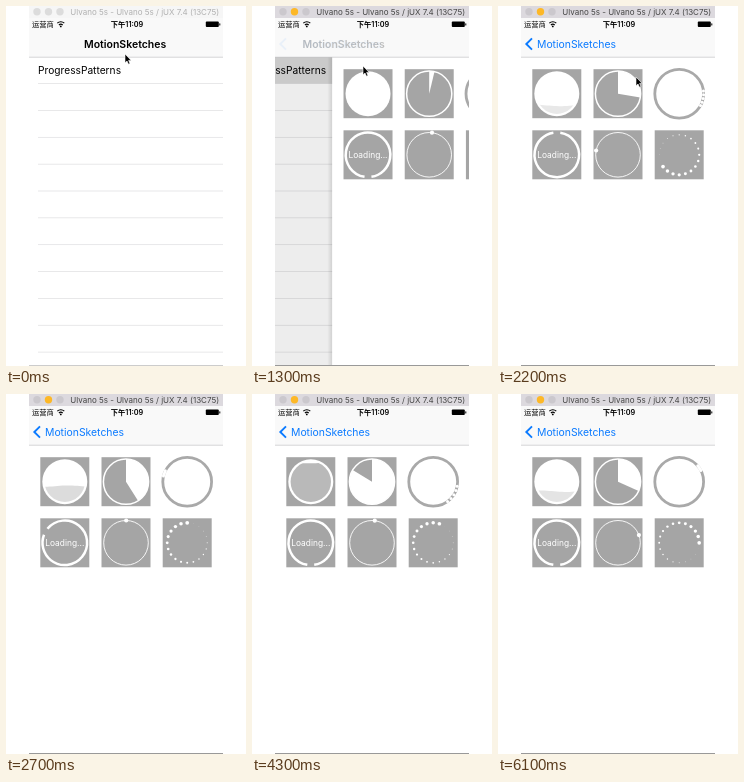
An HTML page that plays this animation: 240 px wide and 360 px high, repeating every 6.2 s.

```html
<!DOCTYPE html>
<html lang="zh">
<head>
<meta charset="utf-8">
<title>Loading indicators</title>
<style>
  html, body { margin: 0; width: 100%; height: 100%; overflow: hidden; background: #fff; }
  svg { display: block; width: 240px; height: 360px; }
  text { font-family: Inter, "Noto Sans CJK SC", "Noto Sans CJK", sans-serif; }
  .tile { fill: #a5a5a5; }
  .ring { fill: none; stroke: #fff; }
  .status { font-size: 7.3px; }
</style>
</head>
<body>
<svg viewBox="0 0 240 360">
  <defs>
    <clipPath id="screen"><rect x="23" y="51" width="194" height="309"/></clipPath>
    <clipPath id="bowl"><circle r="20.2"/></clipPath>
    <linearGradient id="shade">
      <stop offset="0" stop-opacity="0"/>
      <stop offset="1" stop-opacity=".12"/>
    </linearGradient>
  </defs>

  <g clip-path="url(#screen)">
    <g id="list">
      <rect id="row" x="23" y="51" width="194" height="26.8" fill="#d9d9d9"/>
      <text x="32" y="68" font-size="10.2">ProgressPatterns</text>
      <g id="lines" fill="#dedee0"></g>
    </g>
    <rect id="dim" x="23" y="51" width="194" height="309"/>
    <g id="page">
      <rect x="18" y="51" width="5" height="309" fill="url(#shade)"/>
      <rect x="23" y="51" width="194" height="309" fill="#fff"/>

      <g transform="translate(58.8 87.7)">
        <rect class="tile" x="-24.5" y="-24.5" width="49" height="49"/>
        <circle r="22.5" fill="#fff"/>
        <path id="water" clip-path="url(#bowl)"/>
      </g>

      <g transform="translate(120 87.7)">
        <rect class="tile" x="-24.5" y="-24.5" width="49" height="49"/>
        <circle class="ring" r="22.6" stroke-width="1.5"/>
        <path id="pie" fill="#fff"/>
      </g>

      <g transform="translate(181.2 87.7)">
        <circle r="24.4" fill="none" stroke="#a9a9a9" stroke-width="2.8"/>
        <g id="beads" fill="#fff"></g>
      </g>

      <g transform="translate(58.8 148.8)">
        <rect class="tile" x="-24.5" y="-24.5" width="49" height="49"/>
        <circle id="arc" class="ring" r="22.3" stroke-width="2.5" pathLength="360" stroke-dasharray="342 18"/>
        <text y="3" font-size="8.4" fill="#fff" text-anchor="middle">Loading...</text>
      </g>

      <g transform="translate(120 148.8)">
        <rect class="tile" x="-24.5" y="-24.5" width="49" height="49"/>
        <circle class="ring" r="22.3" stroke-width=".9"/>
        <circle id="orbit" r="2.1" fill="#fff"/>
      </g>

      <g transform="translate(181.2 148.8)">
        <rect class="tile" x="-24.5" y="-24.5" width="49" height="49"/>
        <g id="dots" fill="#fff"></g>
      </g>
    </g>
  </g>

  <rect x="23" y="12" width="194" height="39" fill="#f9f9f9"/>
  <rect x="23" y="50.8" width="194" height=".7" fill="#c4c4c6"/>
  <text id="title" y="41.7" font-size="10.5" font-weight="600">MotionSketches</text>
  <g id="back" fill="#0a7aff">
    <path d="M34 32.3 28.3 38 34 43.7" fill="none" stroke="#0a7aff" stroke-width="1.9"/>
    <text id="label" y="41.7" font-size="10.4">MotionSketches</text>
  </g>

  <text class="status" x="26" y="20.8">运营商</text>
  <g fill="none" stroke="#000" stroke-width="1.1">
    <path d="M51.3 17.2a5 5 0 0 1 7 0M52.9 19a2.8 2.8 0 0 1 3.8 0"/>
  </g>
  <circle cx="54.8" cy="20.4" r=".9"/>
  <text class="status" x="121" y="20.8" font-weight="600" text-anchor="middle">下午11:09</text>
  <rect x="199.8" y="15.6" width="13" height="5.3" rx=".9"/>
  <rect x="213.3" y="17.2" width="1" height="2.2" rx=".5"/>

  <rect id="bar" x="23" width="194" height="12"/>
  <circle class="light" cx="31" cy="5.7" r="3.7"/>
  <circle class="light" id="amber" cx="42.5" cy="5.7" r="3.7"/>
  <circle class="light" cx="54" cy="5.7" r="3.7"/>
  <text id="caption" x="138.7" y="8.8" font-size="8" text-anchor="middle">Ulvano 5s - Ulvano 5s / jUX 7.4 (13C75)</text>
  <rect id="base" x="23" y="359" width="194" height="1"/>

  <path id="cursor" d="M0 0V8.8L2 7 3.5 10.2 5 9.5 3.6 6.4H6.2Z" stroke="#fff" stroke-width=".6"/>
</svg>

<script>
const LOOP = 6200, STEP = 100, TAU = Math.PI * 2;
const PUSH = 1152, ACTIVE = 800, PRESS = 1000;
const DOTS = 20;
// time, x, y of the pointer tip
const TRACK = [
  [0, 119, 48], [100, 119, 48], [500, 111, 60], [1500, 111, 60],
  [2200, 138, 71], [2300, 140, 78], [2700, 185, 365]
];

const $ = id => document.getElementById(id);
const set = (el, attrs) => { for (const k in attrs) el.setAttribute(k, attrs[k]); };
const add = (parent, tag, attrs) => {
  const el = document.createElementNS("http://www.w3.org/2000/svg", tag);
  set(el, attrs);
  return parent.appendChild(el);
};
const wrap = v => v - Math.floor(v);
// clock angle in degrees, zero at the top
const polar = (deg, r) => {
  const a = deg * TAU / 360;
  return [r * Math.sin(a), -r * Math.cos(a)];
};
const place = (el, deg, r) => {
  const [cx, cy] = polar(deg, r);
  set(el, { cx, cy });
};

for (let i = 1; i <= 11; i++) add($("lines"), "rect", { x: 32, y: 50.4 + i * 26.85, width: 185, height: .7 });
const beads = Array.from({ length: 5 }, () => add($("beads"), "circle", { r: 1.5 }));
const dots = Array.from({ length: DOTS }, (_, i) => {
  const dot = add($("dots"), "circle", {});
  place(dot, i * 360 / DOTS, 20);
  return dot;
});
const lights = document.querySelectorAll(".light");

function drawWindow(t) {
  const on = t >= ACTIVE;
  set($("bar"), { fill: on ? "#dcd9de" : "#f6f6f6" });
  set($("caption"), { fill: on ? "#444" : "#b0b0b0" });
  set($("base"), { fill: on ? "#999" : "#ccc" });
  lights.forEach(l => set(l, { fill: on ? "#cbc8cd" : "#dcdcdc" }));
  if (on) set($("amber"), { fill: "#fdb827" });
}

function drawPush(t) {
  const p = t < PUSH ? 0 : t > 1900 ? 1 : 1 - Math.exp(-8.25 * (t - PUSH) / 1000);
  const x = 78 - 39 * p;
  set($("row"), { opacity: t >= PRESS ? 1 : 0 });
  set($("list"), { transform: `translate(${-58 * p} 0)` });
  set($("dim"), { opacity: .1 * p });
  set($("page"), { transform: `translate(${194 * (1 - p)} 0)`, opacity: p ? 1 : 0 });
  set($("title"), { x, opacity: (1 - p) ** 1.2 });
  set($("label"), { x });
  set($("back"), { opacity: p ** 8 });
}

function drawCursor(t) {
  const i = TRACK.findIndex(k => k[0] > t);
  set($("cursor"), { opacity: i < 0 ? 0 : 1 });
  if (i < 0) return;
  const [t0, x0, y0] = TRACK[i - 1], [t1, x1, y1] = TRACK[i];
  const f = (t - t0) / (t1 - t0);
  set($("cursor"), { transform: `translate(${x0 + (x1 - x0) * f} ${y0 + (y1 - y0) * f})` });
}

function drawProgress(t) {
  const p = wrap((t - 1160) / 3750);
  const level = 27 - 55 * p;
  let d = "M-25 30";
  for (let x = -25; x <= 25; x += 2.5) {
    d += `L${x} ${level + .7 * Math.sin(x / 8 + t / 160)}`;
  }
  set($("water"), { d: d + "L25 30Z", "fill-opacity": .33 * p });

  const [x, y] = polar(360 * p, 22.6);
  set($("pie"), { d: `M0 0V-22.6A22.6 22.6 0 ${p > .5 ? 1 : 0} 1 ${x} ${y}Z` });
}

function drawSpinners(t) {
  const u = wrap((t - 4300) / 1015 + .4);
  const lag = 12 * Math.sin(Math.PI * u) ** 2;
  beads.forEach((b, i) => place(b, 360 * u - i * lag, 24.4));

  const gap = 180 + .6 * (t - 1300);
  set($("arc"), { transform: `rotate(${gap - 81})` });

  const turn = wrap((t - 1300) / 1500 + .09);
  place($("orbit"), 180 * (1 - Math.cos(Math.PI * turn)), 22.3);

  const head = 245 + .24 * (t - 2200);
  dots.forEach((dot, i) => set(dot, { r: 1.9 - 1.8 * wrap(head / 360 - i / DOTS) }));
}

function frame() {
  const t = Math.floor(performance.now() % LOOP / STEP) * STEP;
  drawWindow(t);
  drawPush(t);
  drawCursor(t);
  drawProgress(t);
  drawSpinners(t);
  requestAnimationFrame(frame);
}
frame();
</script>
</body>
</html>
```
